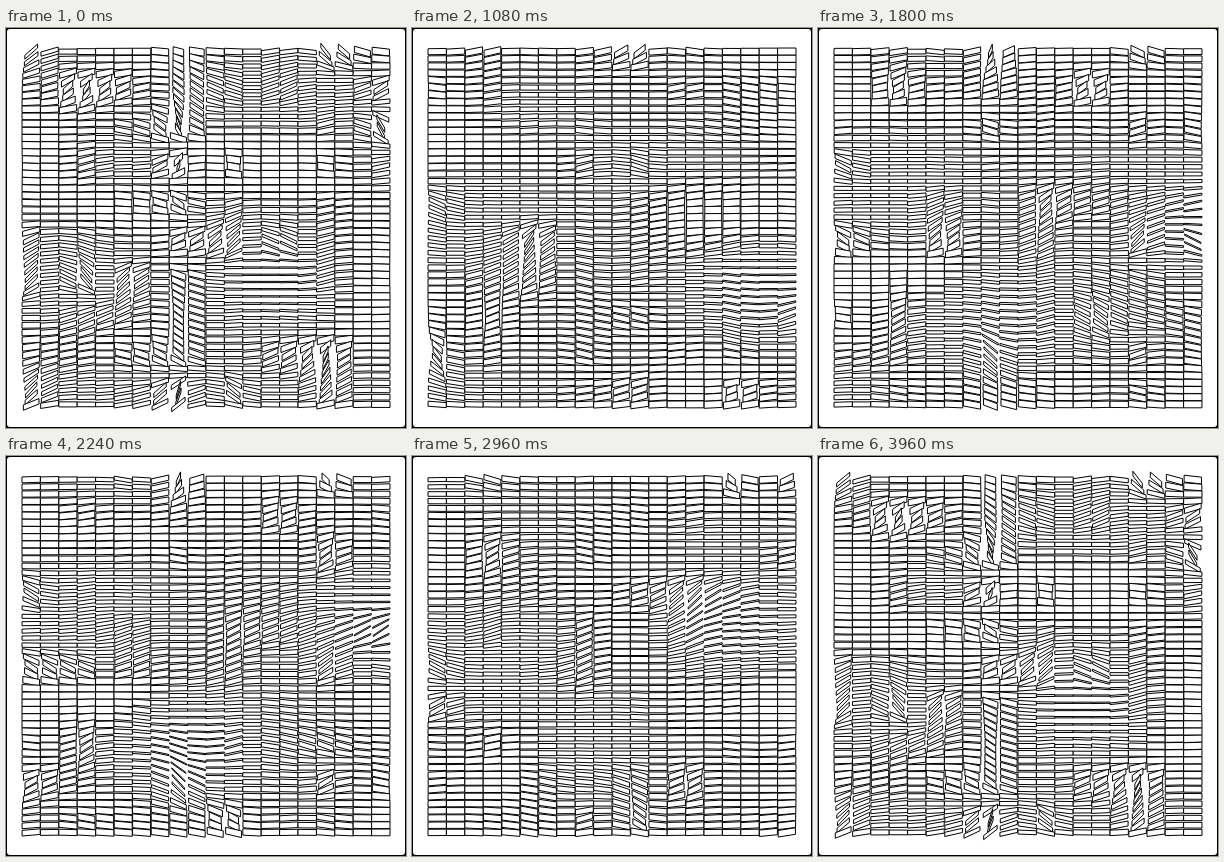
Write an HTML page with a canvas that moves like this. It is 400 by 400 pixels and loops after 4 s.

```html
<!DOCTYPE html>
<html lang="en">
<head>
<meta charset="utf-8">
<title>Turning tiles</title>
<style>
html, body { margin: 0; width: 100%; height: 100%; overflow: hidden; background: #000; }
canvas { display: block; width: 400px; height: 400px; }
</style>
</head>
<body>
<canvas id="stage" width="400" height="400"></canvas>
<script>
const ctx = document.getElementById("stage").getContext("2d");
const LOOP = 4000, STEP = 40, TAU = Math.PI * 2, DEG = Math.PI / 180;
const COLS = 20, ROWS = 50, LEFT = 16, TOP = 20;
const CELL_W = 18.4, CELL_H = 7.2;
const NOISE_PERIOD = 6;

const mix = (a, b, k) => a + (b - a) * k;
const smooth = k => k * k * (3 - 2 * k);
const signedSquare = n => n * Math.abs(n);

function hash(x, y, z, seed) {
  let h = Math.imul(x, 374761393) ^ Math.imul(y, 668265263)
        ^ Math.imul(z, 1103515245) ^ Math.imul(seed, 1274126177);
  h = Math.imul(h ^ (h >>> 15), 2246822519);
  h = Math.imul(h ^ (h >>> 13), 3266489917);
  return ((h ^ (h >>> 16)) >>> 0) / 2147483648 - 1;
}

// Smooth noise in -1..1 that repeats once per loop.
function noise(x, y, phase, seed) {
  const z = phase * NOISE_PERIOD;
  const x0 = Math.floor(x), y0 = Math.floor(y), z0 = Math.floor(z);
  const u = smooth(x - x0), v = smooth(y - y0), w = smooth(z - z0);
  const corner = (i, j, k) => hash(x0 + i, y0 + j, (z0 + k) % NOISE_PERIOD, seed);
  const row = (j, k) => mix(corner(0, j, k), corner(1, j, k), u);
  const plane = k => mix(row(0, k), row(1, k), v);
  return mix(plane(0), plane(1), w);
}

// Drifting areas where the tiles pitch towards edge-on.
function fociAt(phase) {
  const c = Math.cos(phase * TAU), s = Math.sin(phase * TAU);
  const pulse = peak => 0.5 + 0.5 * Math.cos((phase - peak) * TAU);
  return [
    { x: 325 - 60 * c + 12 * s, y: 217 + 35 * c + 50 * s, rx: 75, ry: 55, pitch: 80 },
    { x: 75, y: 205 + 50 * c, rx: 100, ry: 65, pitch: 58 },
    { x: 185, y: 295, rx: 75, ry: 60, pitch: 82 * pulse(0.54) },
    { x: 275, y: 55, rx: 95, ry: 45, pitch: 58 * pulse(0) }
  ];
}

// Each tile is pitched about its horizontal axis and turned about its vertical one.
function drawTile(col, row, phase, foci) {
  const x = LEFT + (col + 0.5) * CELL_W, y = TOP + (row + 0.5) * CELL_H;
  let pitch = 28 + 32 * noise(col * 0.2, row * 0.13, phase, 8);
  for (const focus of foci) {
    const d = ((x - focus.x) / focus.rx) ** 2 + ((y - focus.y) / focus.ry) ** 2;
    pitch = mix(pitch, Math.max(pitch, focus.pitch), Math.exp(-d * d));
  }
  pitch *= DEG;
  const turn = 85 * DEG * signedSquare(noise(col * 0.37, row * 0.19, phase, 3));

  const halfW = CELL_W / 2 * Math.cos(turn);
  const halfH = CELL_H / 2 * Math.cos(pitch);
  const rise = CELL_W / 2 * Math.sin(turn) * Math.sin(pitch);

  ctx.beginPath();
  ctx.moveTo(x - halfW, y - rise - halfH);
  ctx.lineTo(x + halfW, y + rise - halfH);
  ctx.lineTo(x + halfW, y + rise + halfH);
  ctx.lineTo(x - halfW, y - rise + halfH);
  ctx.closePath();
  ctx.fill();
  ctx.stroke();
}

function draw(elapsed) {
  const phase = Math.floor((elapsed % LOOP) / STEP) * STEP / LOOP;
  const foci = fociAt(phase);
  ctx.fillStyle = "#000";
  ctx.fillRect(0, 0, 400, 400);
  ctx.fillStyle = "#fff";
  ctx.beginPath();
  ctx.roundRect(1, 1, 398, 398, 3);
  ctx.fill();
  ctx.strokeStyle = "#000";
  ctx.lineWidth = 1;
  ctx.lineJoin = "round";
  for (let col = 0; col < COLS; col++)
    for (let row = 0; row < ROWS; row++)
      drawTile(col, row, phase, foci);
}

const start = performance.now();
function tick() {
  draw(performance.now() - start);
  requestAnimationFrame(tick);
}
tick();
</script>
</body>
</html>
```
